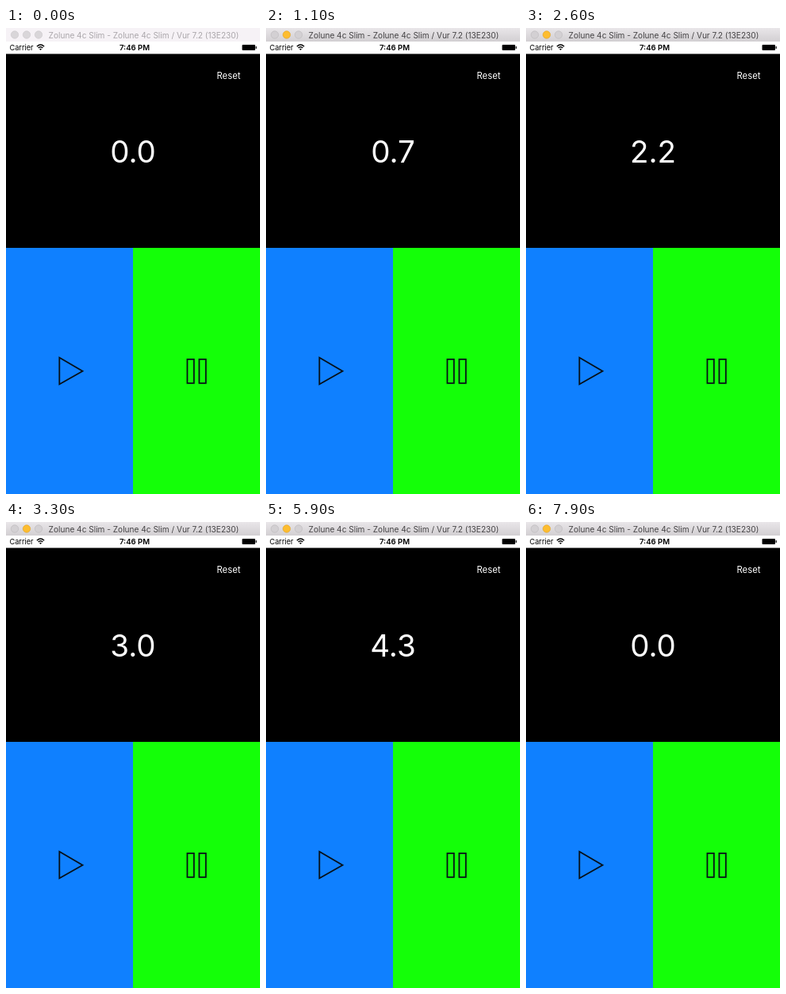
Recreate the animation shown at these times as an HTML page. Size 320 by 585 pixels, loop 8000 ms.

```html
<!DOCTYPE html>
<html lang="en">
<head>
<meta charset="utf-8">
<title>Stopwatch</title>
<style>
  html, body { margin: 0; width: 100%; height: 100%; overflow: hidden; background: #000; }
  svg { display: block; width: 320px; height: 585px; }
  text { font-family: Inter, Roboto, sans-serif; }
  .bar { fill: #f6f2f6; }
  .title { fill: #aaa6aa; font-size: 10.1px; text-anchor: middle; }
  .light { fill: #d9d6d9; stroke: #c9c6c9; stroke-width: .6; }
  .active .bar { fill: url(#chrome); }
  .active .title { fill: #454345; }
  .active .light { fill: #d3d0d3; stroke: #bbb8bb; }
  .active .minimize { fill: #fdbd30; stroke: #dfa023; }
  .icon { fill: none; stroke: #071018; stroke-width: 1.8; }
</style>
</head>
<body>
<svg id="stage" viewBox="0 0 320 585">
  <defs>
    <linearGradient id="chrome" x2="0" y2="1">
      <stop stop-color="#e9e6e9"/>
      <stop offset="1" stop-color="#d2cfd2"/>
    </linearGradient>
  </defs>

  <rect width="320" height="585"/>
  <rect class="bar" width="320" height="17"/>
  <circle class="light" cx="11" cy="8.5" r="4.7"/>
  <circle class="light minimize" cx="26" cy="8.5" r="4.7"/>
  <circle class="light" cx="41" cy="8.5" r="4.7"/>
  <text class="title" x="173.5" y="12.5">Zolune 4c Slim - Zolune 4c Slim / Vur 7.2 (13E230)</text>

  <!-- Status bar -->
  <rect y="17" width="320" height="15.5" fill="#fff"/>
  <text x="4.5" y="28" font-size="9.2">Carrier</text>
  <g fill="none" stroke="#000" stroke-width="1.4">
    <path d="M38.9 23.2Q43.5 18.8 48.1 23.2M40.6 25.1Q43.5 22.3 46.4 25.1"/>
    <path d="M43.5 28L42 26.3Q43.5 25 45 26.3Z" fill="#000" stroke="none"/>
  </g>
  <text x="162" y="28" font-size="9.6" font-weight="600" text-anchor="middle">7:46 PM</text>
  <rect x="297.5" y="21" width="16.5" height="7" rx="1"/>
  <rect x="314.6" y="23" width="1.2" height="3" rx=".5"/>

  <text x="265.5" y="64.3" font-size="11.3" fill="#fff">Reset</text>
  <text id="counter" x="160" y="168.5" font-size="38.5" fill="#fff" text-anchor="middle">0.0</text>

  <!-- Start and pause buttons -->
  <rect y="276" width="160" height="309" fill="#0f80ff"/>
  <rect x="160" y="276" width="160" height="309" fill="#14ff08"/>
  <path class="icon" d="M67.3 413.8L96.5 430.7L67.3 447.3Z"/>
  <path class="icon" d="M228.4 415.8h8.4v30h-8.4zM243.4 415.8h8.4v30h-8.4z"/>
</svg>
<script>
  const LOOP = 8000, TICK = 100, ACTIVATE = 200;
  // [start ms, tenths shown, running]
  const phases = [
    [0, 0, false], [400, 0, true], [2700, 24, true],
    [3500, 32, false], [3800, 32, true],
    [4700, 41, false], [5700, 41, true],
    [6800, 52, false], [7400, 0, false]
  ];
  const stage = document.getElementById('stage');
  const counter = document.getElementById('counter');

  function tenthsAt(time) {
    const [start, tenths, running] = phases.findLast(([from]) => from <= time);
    return tenths + (running ? Math.floor((time - start) / TICK) : 0);
  }

  function draw() {
    const time = performance.now() % LOOP;
    stage.classList.toggle('active', time >= ACTIVATE);
    counter.textContent = (tenthsAt(time) / 10).toFixed(1);
    requestAnimationFrame(draw);
  }
  draw();
</script>
</body>
</html>
```
